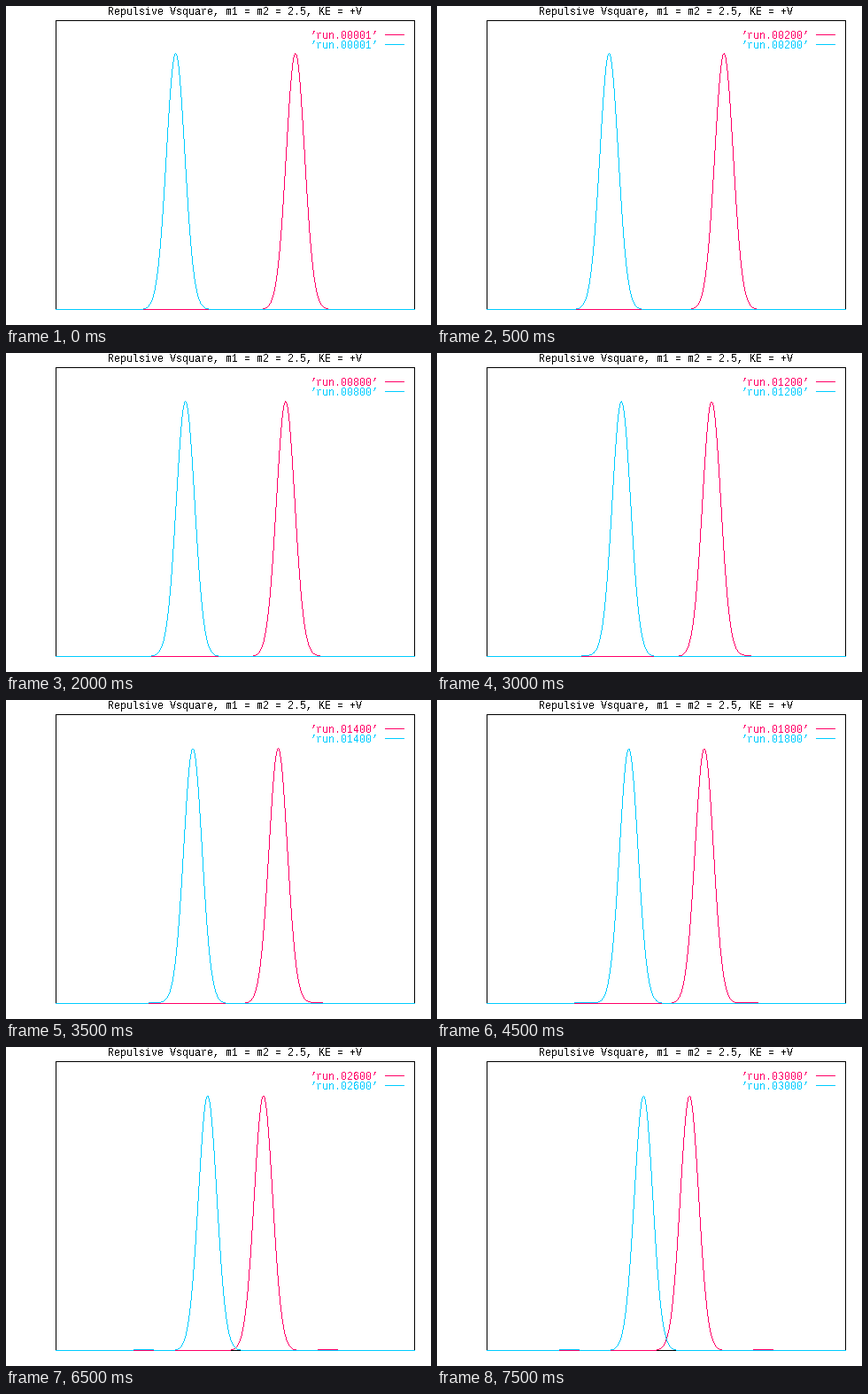
Animation, 480 px wide and 360 px high, one loop 8000 ms. Source, as a matplotlib script:

```python
import numpy as np
import matplotlib.pyplot as plt
from matplotlib.animation import FuncAnimation
from matplotlib.patches import Rectangle

W, H, DPI = 480, 360, 80
FRAMES, INTERVAL = 16, 500
PINK, CYAN = "#ff0066", "#00ccff"
LEFT, RIGHT, TOP, BASE = 56, 461, 16, 342
SIGMA, SPEED = 10.4, 0.0139        # packet width, pixels per time step
START_CYAN, START_PINK = 191.1, 326.4
CHAR = 7                           # character cell width in pixels
FONT = dict(family="Liberation Mono", size=CHAR / 0.6 * 72 / DPI,
            ha="left", va="baseline", antialiased=False)

fig = plt.figure(figsize=(W / DPI, H / DPI), dpi=DPI, facecolor="white")
ax = fig.add_axes([0, 0, 1, 1])
ax.set(xlim=(0, W), ylim=(H, 0))
ax.axis("off")

cols = np.arange(LEFT, RIGHT + 1)
edges = np.arange(LEFT, RIGHT + 2)


def box(x, y, w, h, color):
    ax.add_patch(Rectangle((x, y), w, h, color=color, lw=0))


def bell(x, center):
    return np.exp(-((x - center) / SIGMA) ** 2 / 2)


def packet(x, start, direction, step):
    """Main wave packet plus the faint one running the other way."""
    shift = direction * SPEED * step
    return ((288 - 0.00035 * step) * bell(x, start + shift)
            + 0.92 * bell(x, start - shift))


def trace(*wave):
    """Top and bottom of a one pixel wide curve in every column."""
    mid = np.round(packet(cols, *wave))
    side = np.ceil(packet(edges - 0.5, *wave))
    low = np.minimum(mid, np.minimum(side[:-1], side[1:]))
    high = np.maximum(mid, np.maximum(side[:-1], side[1:]) - 1)
    return BASE - high, BASE - low + 1


def curve(color):
    flat = np.full(len(cols), BASE)
    return ax.stairs(flat, edges, baseline=flat + 1, fill=True,
                     color=color, lw=0)


def key(y, color):
    box(428, y, 22, 1, color)
    return ax.text(344, y + 5, "", color=color, **FONT)


box(LEFT, TOP, RIGHT - LEFT + 1, BASE - TOP + 1, "black")
box(LEFT + 1, TOP + 1, RIGHT - LEFT - 1, BASE - TOP - 1, "white")
ax.text(115, 10, "Repulsive Vsquare, m1 = m2 = 2.5, KE = +V",
        color="black", **FONT)

labels = [key(32, PINK), key(43, CYAN)]
pink, cyan = curve(PINK), curve(CYAN)
ax.set(xlim=(0, W), ylim=(H, 0))


def update(i):
    step = max(1, 200 * i)
    for patch, start, direction in ((pink, START_PINK, -1),
                                    (cyan, START_CYAN, 1)):
        top, bottom = trace(start, direction, step)
        patch.set_data(values=top, edges=edges, baseline=bottom)
    for label in labels:
        label.set_text(f"’run.{step:05d}’")
    return [pink, cyan, *labels]


anim = FuncAnimation(fig, update, frames=FRAMES, interval=INTERVAL,
                     init_func=lambda: update(0), repeat=True, repeat_delay=0)
plt.show()
```
